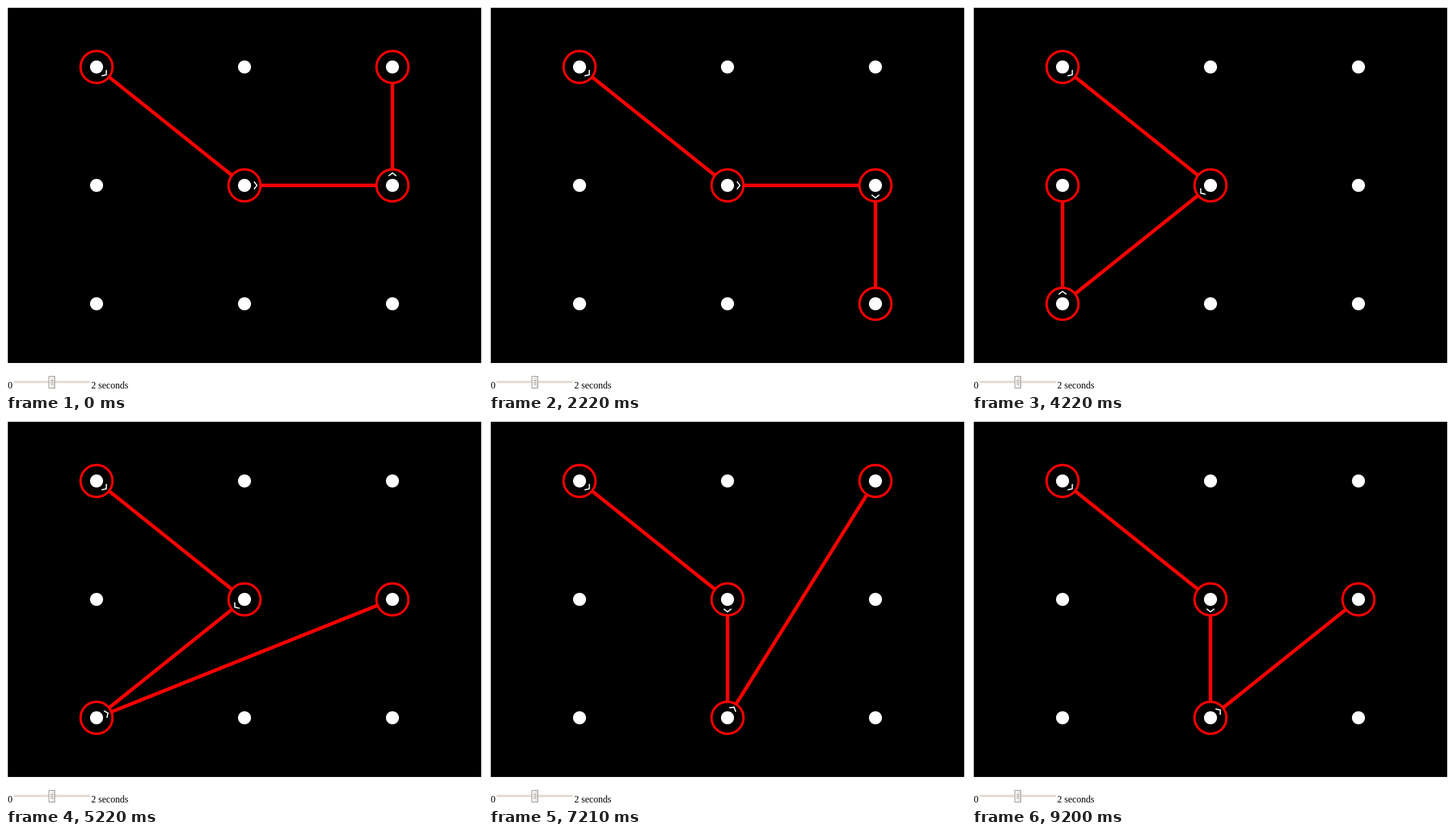
Write an HTML page with a canvas that moves like this. It is 806 by 652 pixels and loops after 9940 ms.

```html
<!DOCTYPE html>
<html lang="en">
<head>
<meta charset="utf-8">
<title>Pattern lock</title>
<style>
  html, body { margin: 0; width: 100%; height: 100%; overflow: hidden; background: #fff; }
  canvas { position: absolute; left: 0; top: 0; display: block; }
  span {
    position: absolute; top: 632px; white-space: nowrap; color: #000;
    font: 16px/18px "Liberation Serif", "Times New Roman", serif;
  }
</style>
</head>
<body>
<canvas id="stage" width="806" height="652"></canvas>
<span style="left:3px">0</span>
<span style="left:144px">2 seconds</span>
<script>
const ctx = document.getElementById('stage').getContext('2d');
const LOOP = 9940;

// Start time and the dots visited, numbered 1-9 row by row
const steps = [
  [0, '1563'], [230, '1567'], [1220, '1568'], [2220, '1569'],
  [3220, '1572'], [4220, '1574'], [5220, '1576'], [6220, '1578'],
  [7210, '1583'], [8210, '1584'], [9200, '1586']
];

const dot = n => ({ x: 153 + (n - 1) % 3 * 250, y: 103 + Math.floor((n - 1) / 3) * 200 });

function rect(color, x, y, w, h) {
  ctx.fillStyle = color;
  ctx.fillRect(x, y, w, h);
}

function disc(p, r, color) {
  ctx.beginPath();
  ctx.arc(p.x, p.y, r, 0, Math.PI * 2);
  ctx.fillStyle = color;
  ctx.fill();
}

function stroke(points, color, width) {
  ctx.beginPath();
  points.forEach(([x, y]) => ctx.lineTo(x, y));
  ctx.strokeStyle = color;
  ctx.lineWidth = width;
  ctx.stroke();
}

function ring(p) {
  disc(p, 27, '#000');
  ctx.strokeStyle = '#f00';
  ctx.lineWidth = 4;
  ctx.stroke();
}

function arrow(from, to) {
  ctx.save();
  ctx.translate(from.x, from.y);
  ctx.rotate(Math.atan2(to.y - from.y, to.x - from.x));
  stroke([[16, -6.5], [21, 0], [16, 6.5]], '#fff', 2);
  ctx.restore();
}

function slider() {
  rect('#e3ddd5', 13, 633, 129, 4);
  rect('#8f8b86', 72, 625, 11, 21);
  const shade = ctx.createLinearGradient(73, 0, 82, 0);
  shade.addColorStop(0, '#fbfaf9');
  shade.addColorStop(1, '#e2dfda');
  rect(shade, 73, 626, 9, 19);
  for (let y = 632; y <= 638; y += 3) rect('#9a958e', 75, y, 5, 1);
}

function draw(path) {
  rect('#fff', 0, 0, 806, 652);
  rect('#000', 3, 3, 800, 600);
  const nodes = [...path].map(dot);
  stroke(nodes.map(p => [p.x, p.y]), '#f00', 6);
  nodes.forEach(ring);
  for (let n = 1; n <= 9; n++) disc(dot(n), 11, '#fff');
  nodes.slice(1).forEach((p, i) => arrow(nodes[i], p));
  slider();
}

function frame() {
  const t = performance.now() % LOOP;
  draw(steps.filter(([start]) => start <= t).pop()[1]);
  requestAnimationFrame(frame);
}
frame();
</script>
</body>
</html>
```
